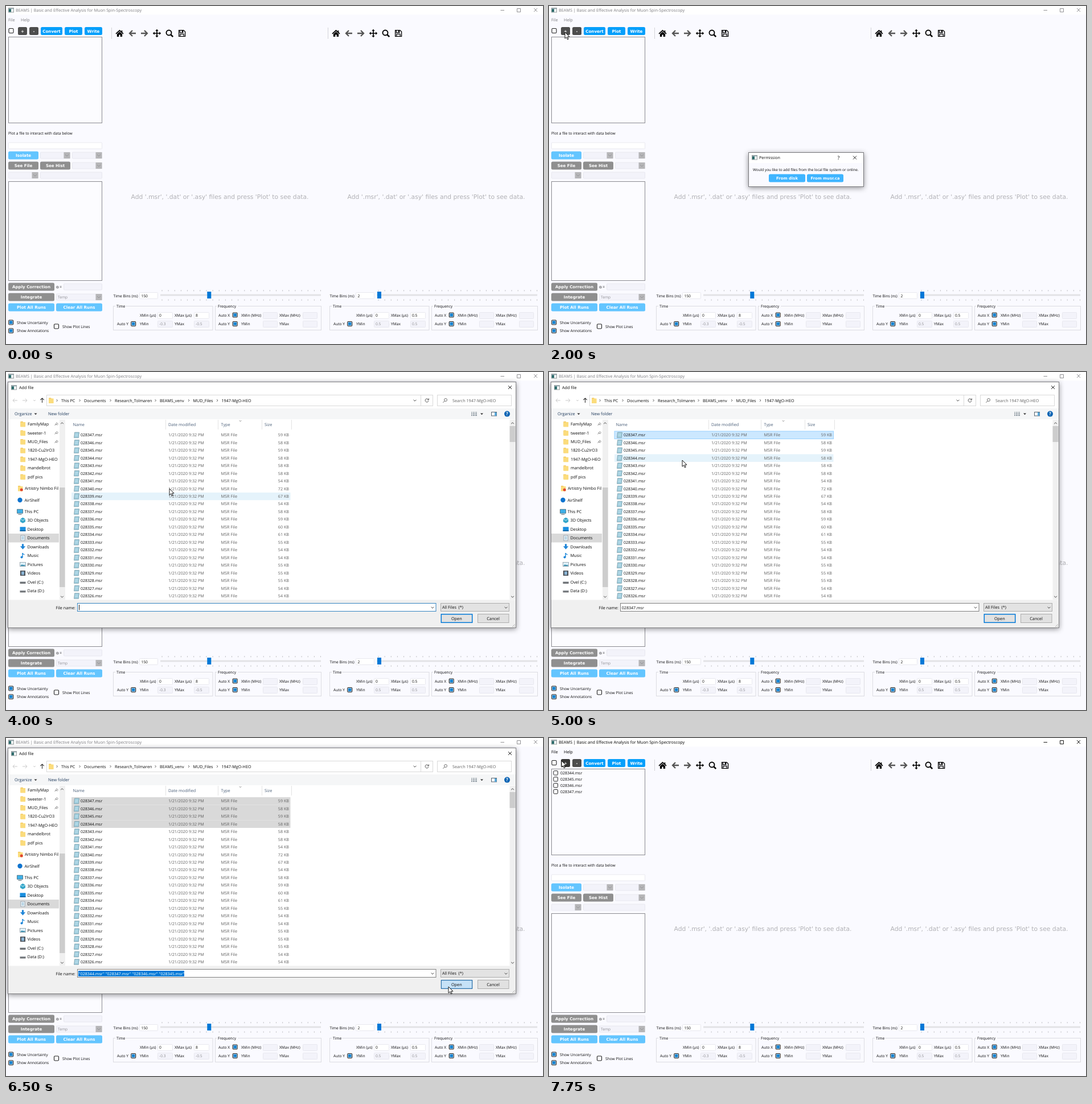
An HTML page that plays this animation: 943x594 px, repeating every 8000 ms.

```html
<!DOCTYPE html>
<html lang="en">
<head>
<meta charset="utf-8">
<title>Adding files</title>
<style>
html, body { margin: 0; width: 100%; height: 100%; overflow: hidden; background: #fafaff; }
svg { display: block; width: 943px; height: 594px; font-family: "Open Sans", "Noto Sans", sans-serif; text-rendering: geometricPrecision; }
text { white-space: pre; }
.bold { font-family: "DejaVu Sans", sans-serif; font-weight: bold; }
.plot { font-family: "DejaVu Sans", sans-serif; }
.window { filter: drop-shadow(0 2px 5px rgba(0, 0, 0, .42)); }
#bar text { fill: #7c7c80; }
#bar path { stroke: #858588; }
#bar.active text { fill: #000; }
#bar.active path { stroke: #000; }
#open { fill: #e1e1e1; stroke: #0078d7; stroke-width: 1.5; }
#open.hover { fill: #e5f1fb; stroke-width: 1; }
#open.pressed { fill: #c6e2f7; stroke: #005499; stroke-width: 1; }
</style>
</head>
<body>
<svg id="stage" viewBox="0 0 943 594"></svg>
<script>
const STEP = 250, LOOP = 8000;
const INK = '#0c0c0c', BLUE = '#0078d7', PALE = '#63c5ff', GREY = '#8f8f8f';

// Drawing helpers, all returning SVG markup
const rect = (x, y, w, h, fill, stroke = 'none', rx = 0, sw = 1) =>
  `<rect x="${x}" y="${y}" width="${w}" height="${h}" rx="${rx}" fill="${fill}" stroke="${stroke}" stroke-width="${sw}"/>`;
const text = (x, y, s, size = 6.65, fill = INK, more = '') =>
  `<text x="${x}" y="${y}" font-size="${size}" fill="${fill}" ${more}>${s}</text>`;
const path = (d, stroke = INK, sw = 1, fill = 'none') =>
  `<path d="${d}" stroke="${stroke}" stroke-width="${sw}" fill="${fill}"/>`;
const circle = (x, y, r, fill, stroke = 'none', sw = 1) =>
  `<circle cx="${x}" cy="${y}" r="${r}" fill="${fill}" stroke="${stroke}" stroke-width="${sw}"/>`;
const group = (id, body, more = '') => `<g id="${id}" ${more}>${body}</g>`;
const at = (x, y, body) => `<g transform="translate(${x} ${y})">${body}</g>`;
const tag = (id, shape) => shape.replace(/^<\w+/, `$& id="${id}"`);
const times = (n, f) => Array.from({ length: n }, (_, i) => f(i)).join('');

const down = (x, y, s = 2.4, c = '#444') => path(`M${x - s} ${y - s / 2}l${s} ${s}l${s} ${-s}`, c);
const up = (x, y, s = 2.4, c = '#444') => path(`M${x - s} ${y + s / 2}l${s} ${-s}l${s} ${s}`, c);
const right = (x, y) => path(`M${x - 1} ${y - 2}l2 2l-2 2`, '#555', .9);
const drop = (x, y) => path(`M${x - 2.5} ${y - 1}h5l-2.5 2.8z`, 'none', 0, '#333');
const cross = (x, y, c = INK) => path(`M${x - 3} ${y - 3}l6 6m0 -6l-6 6`, c, .9);
const button = (x, y, w, label, fill, h = 14, size = 7.1) =>
  rect(x, y, w, h, fill, 'none', 2.5) +
  text(x + w / 2, y + h / 2 + 2.6, label, size, '#fff', 'class="bold" text-anchor="middle"');
const edit = (x, y, w, on, h = 11) => rect(x + .5, y + .5, w - 1, h, on ? '#fff' : '#f3f3fa', '#e8e8ef', 1);
const combo = (x, y, w) => edit(x, y, w) + rect(x + w - 11.5, y + .5, 11, 11, '#b6b6b8') +
  down(x + w - 6, y + 6, 3, '#949498');
const check = (x, y, on) => rect(x, y, 8, 8, on ? '#fff' : '#fdfdff', '#222', 1.5, 1.1) +
  (on ? rect(x + 1.2, y + 1.2, 5.6, 5.6, '#1783d0') : '');
const appIcon = (x, y) => rect(x + .5, y + .5, 9, 7.5, '#f4f6f6', '#8a9294', 0, .9) +
  rect(x + 1, y + 1, 4, 6.5, '#2c6b6b') + rect(x + 1, y + 1, 8, 1.4, '#9fb3ba');

function titleBar() {
  return rect(0, 0, 943, 15, '#fff') + appIcon(4, 3) + group('bar',
    text(17, 10.2, 'BEAMS | Basic and Effective Analysis for Muon Spin-Spectroscopy', 7.28) +
    text(4, 26.8, 'File', 7.3) + text(26, 26.8, 'Help', 7.3) +
    path('M868.5 7.5h6.5M897.5 4.5h6v6h-6zM927 4l6 6m0 -6l-6 6', '', .9));
}

function sidePanel() {
  return check(5, 39.5) + tag('plus', button(21, 37, 16, '+', '#4d4d4d')) +
    button(41, 37, 16, '-', '#4d4d4d') + button(61, 37, 38, 'Convert', '#059ffb') +
    button(103, 37, 31, 'Plot', '#059ffb') + button(138, 37, 31, 'Write', '#059ffb') +
    rect(4.5, 54.5, 164, 151, '#fcfcff', '#8b8b90') +
    text(4, 226.4, 'Plot a file to interact with data below') + edit(4, 239.5, 165, true) +
    button(4, 255.5, 53, 'Isolate', PALE) + combo(60, 256.5, 53) + combo(116, 256.5, 53) +
    button(4, 273.5, 53, 'See File', GREY) + button(60, 273.5, 53, 'See Hist', GREY) + combo(116, 274.5, 53) +
    combo(4, 291.5, 53) + edit(60, 291.5, 109) +
    rect(4.5, 308.5, 164, 174, '#fcfcff', '#8b8b90') +
    button(4, 486.5, 81, 'Apply Correction', GREY) + text(88, 496.4, 'α =', 7) + edit(101, 487.5, 68) +
    button(4, 504.5, 81, 'Integrate', GREY) + combo(88, 505.5, 81) + text(91, 514.4, 'Temp', 6.65, '#909094') +
    button(4, 522.5, 81, 'Plot All Runs', PALE) + button(88, 522.5, 81, 'Clear All Runs', PALE) +
    check(4.7, 552, true) + text(19, 558.6, 'Show Uncertainty') +
    check(4.7, 566.7, true) + text(19, 573.4, 'Show Annotations') +
    check(84.5, 559) + text(99, 566.2, 'Show Plot Lines');
}

function toolIcons() {
  const back = 'M6 0h-11M0 -5l-5 5l5 5';
  return times(9, i => rect(185, 38.5 + i * 2.2, 1, 1, '#a5a5aa')) +
    at(199.5, 48, path('M-6.5 .8L0 -5L6.5 .8', '#000', 1.7) + path('M3 -5h1.8v4h-1.8z', 'none', 0, '#000') +
      path('M-4.6 1.2L0 -2.8L4.6 1.2V6H1.2V2.4H-1.2V6H-4.6z', 'none', 0, '#000')) +
    at(222, 48, path(back, '#555', 2.3)) +
    `<g transform="translate(243 48) scale(-1 1)">${path(back, '#555', 2.3)}</g>` +
    at(265, 48, path('M-5 0H5M0 -5V5', '#000', 1.7) +
      path('M0 -7.2l2.7 3h-5.4zM0 7.2l2.7 -3h-5.4zM-7.2 0l3 -2.7v5.4zM7.2 0l-3 -2.7v5.4z', 'none', 0, '#000')) +
    at(287, 48, circle(-1, -1, 4.5, 'none', '#000', 1.9) + path('M2.2 2.2l4 4', '#000', 2.6)) +
    at(309, 48, path('M-5.4 -5.4H3L5.6 -2.8V5.4H-5.4z', '#000', 1.3) +
      path('M-3.6 -5v3.8h5.4v-3.8M-3.2 5V1.4h6.4V5', '#000', 1.2) + rect(-.2, -5, 1.6, 3, '#000'));
}

function plotPanel(dx, bins, knob, xMax, yMin, yMax) {
  const dim = '#8c8c90', row1 = 546.4, row2 = 561.3;
  const ticks = times(26, i => `M${274 + i * 11.14} 499v2.3m0 14.2v2.3`);
  return at(dx, 0, toolIcons() +
    text(375.5, 338.6, "Add '.msr', '.dat' or '.asy' files and press 'Plot' to see data.", 10.75, '#b1b1b5',
      'class="plot" text-anchor="middle"') +
    text(188.5, 511.6, 'Time Bins (ns)') + edit(234, 503, 33, true) + text(237.5, 511.6, bins) +
    path(ticks, '#b9b9be', .9) + rect(271, 506.5, 282, 3, '#e3e3e6') + rect(knob, 502, 7, 12, BLUE) +
    rect(188.5, 527.5, 174.5, 42, 'none', '#dcdce1') + rect(192, 525, 18, 5, '#fafaff') + text(194, 529.8, 'Time') +
    rect(367.5, 527.5, 186, 42, 'none', '#dcdce1') + rect(370, 525, 37, 5, '#fafaff') + text(372, 529.8, 'Frequency') +
    text(235, row1, 'XMin (µs)') + edit(266, 538, 27, true) + text(269, row1, '0') +
    text(296, row1, 'XMax (µs)') + edit(330, 538, 27, true) + text(333, row1, xMax) +
    text(195, row2, 'Auto Y') + check(219.7, 554.5, true) +
    text(235, row2, 'YMin') + edit(266, 553, 27) + text(269, row2, yMin, 6.65, dim) +
    text(296, row2, 'YMax') + edit(330, 553, 27) + text(333, row2, yMax, 6.65, dim) +
    text(373, row1, 'Auto X') + check(398.2, 539, true) + text(413, row1, 'XMin (MHz)') + edit(451, 538, 26) +
    text(480, row1, 'XMax (MHz)') + edit(521, 538, 26) +
    text(373, row2, 'Auto Y') + check(398.2, 554.5, true) + text(413, row2, 'YMin') + edit(451, 553, 26) +
    text(480, row2, 'YMax') + edit(521, 553, 26));
}

function permission() {
  return rect(350.5, 257.5, 202, 60, '#fafaff', '#77777b') + rect(351, 258, 201, 18, '#fff') + appIcon(356, 262) +
    text(369, 269.2, 'Permission', 7.15) + text(506.5, 269.6, '?', 9) + cross(537, 266.5) +
    text(358, 290.2, 'Would you like to add files from the local file system or online.', 6.45) +
    button(386, 295.5, 64, 'From disk', '#3fb5ff', 14, 6.9) + button(453, 295.5, 64, 'From musr.ca', '#3fb5ff', 14, 6.75);
}

const folder = (x, y) => rect(x, y - 4.5, 4.5, 9, '#eebf4d', 'none', .6) + rect(x, y - 3.6, 8.6, 8.6, '#fbdc7c', 'none', .6);
const ICON = {
  pc: '<path d="M0 -4h10v7h-10z" fill="#3fb0e8" stroke="#4a6572" stroke-width=".8"/><path d="M2 5h6" stroke="#4a6572"/>',
  cube: '<path d="M5 -5l4.5 2.5v5l-4.5 2.5l-4.5 -2.5v-5z" fill="#35a6c9"/><path d="M.5 -2.5l4.5 2.5l4.5 -2.5" fill="none" stroke="#d7f2f9"/>',
  desk: rect(0, -4, 10, 7.5, '#1a8fe0') + rect(0, 2, 10, 1.5, '#0d5c9b'),
  doc: rect(1.5, -4.5, 7, 9, '#fff', '#8296a5', 0, .8) + path('M3 -2h4M3 0h4M3 2h4', '#4a91bd', .8),
  load: path('M3.4 -5h3.2v4h3l-4.6 5.5l-4.6 -5.5h3z', 'none', 0, '#2186d8'),
  note: path('M4.5 3V-4.5q.5 2 3.5 3', '#1985d8', 1.4) + circle(3, 3, 2, '#1985d8'),
  pic: rect(0, -3.5, 10, 7, '#dff1fb', '#8d9ba3', 0, .8) + path('M.5 3l3 -3l2 1.5l2 -1l2 2.5z', 'none', 0, '#3b8fae'),
  film: rect(.5, -4.5, 9, 9, '#4b4f55') + rect(2.5, -3, 5, 6, '#8ab4d4'),
  disk: rect(0, 0, 10, 3, '#686c70') + rect(0, -1, 10, 1.2, '#bfc4c8'),
  art: folder(1, 0) + circle(7.2, 2.6, 2.5, '#e2452f'),
  sky: circle(5, 0, 4.2, '#0f74cf')
};

function sidebar() {
  const pins = ['FamilyMap', 'tweeter-1', 'MUD_Files', '1820-Cu2IrO3', '1947-MgO-HEO', 'mandelbrot', 'pdf pics'];
  const places = [['cube', '3D Objects'], ['desk', 'Desktop'], ['doc', 'Documents'], ['load', 'Downloads'],
    ['note', 'Music'], ['pic', 'Pictures'], ['film', 'Videos'], ['disk', 'Ovel (C:)'], ['disk', 'Data (D:)']];
  const item = (x, y, icon, name) => at(x, y, ICON[icon]) + text(x + 13, y + 2.6, name, 7.3);
  return rect(4, 284, 89, 15.5, '#d9d9d9') + '<g clip-path="url(#side)">' +
    pins.map((s, i) => folder(25.5, 91.5 + i * 15.45) + text(38, 94.1 + i * 15.45, s, 7.3)).join('') +
    times(3, i => path(`M85.5 ${94 + i * 15.45}l2 -2m-1 -1l2.2 2.2m-1.2 -2.6l2.8 2.8m-2.2 -3.4l1 -1l2.2 2.2l-1 1`, '#777', .9)) +
    item(20, 204.5, 'art', 'Artistry Nimbo Fil') + item(19.5, 225, 'sky', 'AirShelf') + item(19.5, 245.3, 'pc', 'This PC') +
    places.map(([k, s], i) => item(24.5, 260.8 + i * 15.45, k, s)).join('') + '</g>' +
    rect(94, 84, 10, 316, '#f0f0f0') + rect(94, 203, 9.5, 175, '#cdcdcd') + up(98.5, 90) + down(98.5, 395);
}

const SIZES = [59, 58, 59, 58, 58, 58, 54, 72, 67, 54, 58, 59, 60, 61, 55, 54, 54, 55, 55, 55, 54, 54];
const PITCH = 13.465;

function fileRows() {
  const dim = '#626262';
  return SIZES.map((kb, i) => {
    const y = 110.8 + i * PITCH, base = y + 2.5;
    return rect(115, y - PITCH / 2, 384.5, PITCH, 'none').replace('<rect', '<rect class="row"') +
      path(`M120.5 ${y - 4.8}h8l-1 9.6h-8z`, '#7898a4', .7, '#9ccbdc') + path(`M121.5 ${y - 1.6}h5m-5.3 2.6h5`, '#d3edf5', .9) +
      text(131, base, `0${28347 - i}.msr`, 6.95) + text(285, base, '1/21/2020 9:32 PM', 7.2, dim) +
      text(377.5, base, 'MSR File', 7.3, dim) + text(497, base, kb + ' KB', 7.2, dim, 'text-anchor="end"');
  }).join('');
}

function fileDialog() {
  const crumbs = [[97, 'This PC'], [137, 'Documents'], [191, 'Research_Tolmaren'], [270, 'BEAMS_venv'],
    [328.5, 'MUD_Files'], [378.5, '1947-MgO-HEO']];
  const heads = [[117.5, 'Name'], [285, 'Date modified'], [377.5, 'Type'], [454, 'Size']];
  const arrow = 'M4 0h-8m3.2 -3.2l-3.2 3.2l3.2 3.2';
  return rect(3.5, 17.5, 892, 432, '#fff', '#7d7d80') + appIcon(9, 23) + text(23, 30, 'Add file', 7.3) + cross(885, 27) +
    at(16, 50, path(arrow, '#c9c9c9')) + `<g transform="translate(33 50) scale(-1 1)">${path(arrow, '#c9c9c9')}</g>` +
    down(50, 50, 1.6, '#bbb') + `<g transform="translate(63.5 50) rotate(90)">${path(arrow, '#333', 1.1)}</g>` +
    rect(71.5, 40.5, 678, 19, '#fff', '#d9d9d9') + path('M728.5 41v18', '#d9d9d9') + folder(75, 50) +
    crumbs.map(([x, s]) => right(x - 7.5, 50) + text(x, 52.5, s, 7.2)).join('') + down(718, 50) +
    path('M741.8 48.6a3 3 0 1 0 .2 2.2M742.4 46.4v2.6h-2.6', '#444', .9) +
    rect(757.5, 40.5, 130, 19, '#fff', '#d9d9d9') + circle(772, 49, 2.5, 'none', '#666', .9) + path('M770.2 51l-2.8 2.8', '#666') +
    text(784, 52.5, 'Search 1947-MgO-HEO', 7.2, '#626262') +
    rect(4, 64, 891, 19, '#f5f6f7') + text(15, 76.2, 'Organize', 7.3, '#1e395b') + drop(52, 73.5) +
    text(74, 76.2, 'New folder', 7.3, '#1e395b') +
    times(3, i => path(`M817 ${71 + i * 2.7}h2m1 0h3m1 0h3`, '#66747f', 1.2)) + drop(835.5, 73.5) +
    rect(852.5, 70.5, 9, 6.5, '#fff', '#55636e') + rect(858, 71, 3.5, 6, '#58a9dc') +
    circle(880, 73.6, 5, '#0b64b4') + text(880, 76.4, '?', 8, '#fff', 'text-anchor="middle" font-weight="bold"') +
    sidebar() + heads.map(([x, s]) => text(x, 94.6, s, 7.3, '#4c607a')).join('') +
    path('M280.5 84v17m92 -17v17m77 -17v17m52 -17v17', '#e3e3e3') + down(411.5, 86, 1.8, '#888') + fileRows() +
    rect(884.5, 84, 10.5, 316, '#f0f0f0') + rect(884.5, 95, 10, 28, '#cdcdcd') + up(889.5, 90) + down(889.5, 395) +
    rect(4, 400.5, 891, 48.5, '#f0f0f0') + text(122, 416.5, 'File name:', 7.25, INK, 'text-anchor="end"') +
    tag('field', rect(125.5, 406.5, 629.5, 14, '#fff')) + tag('mark', rect(127, 409, 186, 10, BLUE)) +
    text(127.8, 416.5, '', 7.1, INK, 'id="name"') + tag('caret', path('M128.5 409v9.5', '#000', .9)) +
    down(749, 414) + rect(763.5, 406.5, 120, 14, '#e3e3e3', '#adadad') + text(766, 416.4, 'All Files  (*)', 7.2) + down(878, 414) +
    tag('open', rect(764.3, 425.7, 54.4, 14.6, '')) +
    text(791.3, 435.6, 'Open', 7.3, INK, 'text-anchor="middle"') + rect(828.5, 425.5, 54.5, 15, '#e1e1e1', '#adadad') +
    text(855.5, 435.6, 'Cancel', 7.3, INK, 'text-anchor="middle"') + path('M889 448l5 -5m-2 5l2 -2', '#b5b5b5');
}

const added = times(4, i => rect(8, 57.7 + i * 10.95, 7.4, 7.4, '#fdfdff', '#222', 1.4) +
  text(20, 64 + i * 10.95, `02834${4 + i}.msr`, 6.95));

const $ = id => document.getElementById(id);
$('stage').innerHTML = '<clipPath id="side"><rect x="4" y="84" width="88.5" height="316"/></clipPath>' +
  rect(0, 0, 943, 594, '#fafaff') + titleBar() + sidePanel() + group('added', added) +
  plotPanel(0, 150, 353.3, 8, '-0.3', '-0.5') + plotPanel(380, 2, 272, '0.5', '0.5', '0.5') +
  group('ask', permission(), 'class="window"') + group('dialog', fileDialog(), 'class="window"') +
  group('cursor', path('M0 0V11.2L2.6 8.8L4.4 12.9L6.2 12.1L4.4 8.1H8z', '#000', .9, '#fff'));

// Pointer way points: step, x, y
const WAY = [[1, 206, 396], [3, 120, 250], [5, 40, 75], [6, 28, 46], [8, 28, 46], [11, 407, 303], [13, 407, 310],
  [15, 407, 310], [16, 287, 205], [18, 236, 112], [19, 234, 113], [20, 234, 155], [22, 234, 153], [25, 777, 437],
  [27, 777, 437], [30, 163, 54], [31, 22, 40]];
const HOVER = { 16: 8, 17: 4, 20: 3 };
const rows = [...document.querySelectorAll('.row')];
const show = (id, on) => $(id).setAttribute('visibility', on ? 'visible' : 'hidden');
const within = (n, a, b) => n >= a && n <= b;

function pointer(n) {
  const k = Math.max(1, WAY.findIndex(p => p[0] >= n));
  const [a, x, y] = WAY[k - 1], [b, u, v] = WAY[k], f = Math.max(0, (n - a) / (b - a));
  return `translate(${x + (u - x) * f} ${y + (v - y) * f})`;
}

function draw(n) {
  const chosen = n >= 21 ? 4 : n >= 18 ? 1 : 0, clicked = n >= 26, dialog = within(n, 15, 26);
  $('bar').setAttribute('class', n === 7 || n === 13 || n >= 27 ? 'active' : '');
  $('plus').setAttribute('fill', within(n, 6, 7) || n === 31 ? '#353535' : '#4d4d4d');
  show('added', n >= 28);
  show('ask', within(n, 8, 12));
  show('dialog', dialog);
  $('dialog').setAttribute('opacity', n === 15 ? .88 : 1);
  rows.forEach((r, i) => {
    const on = i < chosen;
    r.setAttribute('fill', on ? (clicked ? '#d9d9d9' : '#cce8ff') : HOVER[n] === i ? '#e5f3fb' : 'none');
    r.setAttribute('stroke', on && !clicked && i === chosen - 1 ? '#99d1ff' : 'none');
  });
  const order = [4, 7, 6, 5].map(d => `"02834${d}.msr"`).join(' ');
  $('name').textContent = chosen === 4 ? order : chosen ? '028347.msr' : '';
  $('name').setAttribute('fill', clicked ? '#fff' : INK);
  $('field').setAttribute('stroke', chosen ? '#7f7f7f' : '#3584c0');
  show('mark', dialog && clicked);
  show('caret', dialog && !chosen);
  $('open').setAttribute('class', clicked ? 'pressed' : n === 25 ? 'hover' : '');
  show('cursor', n > 0);
  $('cursor').setAttribute('transform', pointer(n));
}

const start = performance.now();
let last = -1;
function tick() {
  const n = Math.floor((performance.now() - start) % LOOP / STEP);
  if (n !== last) draw(last = n);
  requestAnimationFrame(tick);
}
tick();
</script>
</body>
</html>
```
